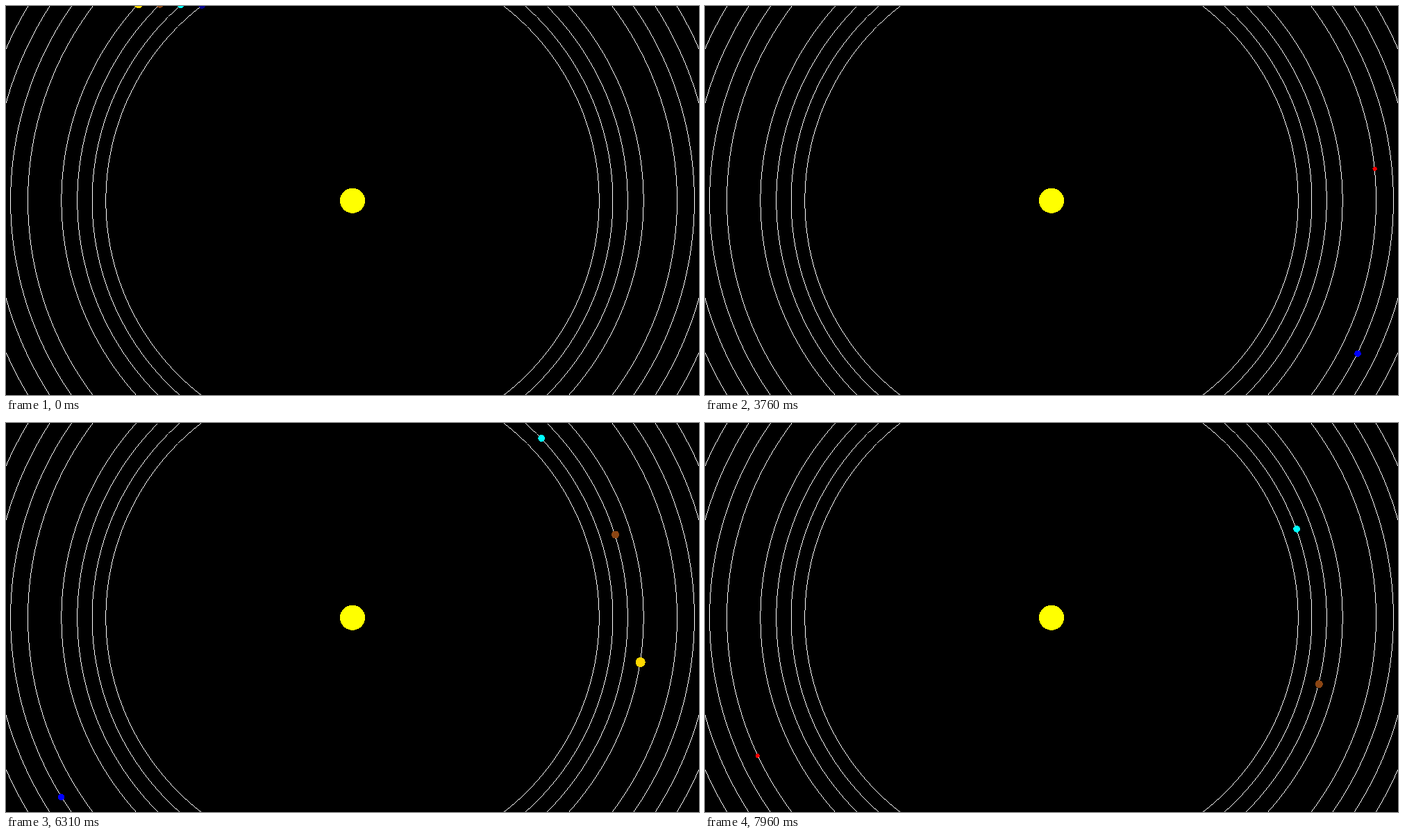
Write an HTML page with a canvas that moves like this. It is 998x561 px and loops after 7.99 s.

```html
<!DOCTYPE html>
<html lang="en">
<head>
<meta charset="utf-8">
<title>Orbits</title>
<style>
  html, body { margin: 0; width: 100%; height: 100%; overflow: hidden; background: #000; }
  canvas { display: block; }
</style>
</head>
<body>
<canvas id="stage" width="998" height="561"></canvas>
<script>
const W = 998, H = 561, LOOP = 7990, STEP_MS = 30;
const SCALE = W / 1920;
const CX = W / 2, CY = 540 * SCALE;

// Each planet starts on the top edge, `offset` units left of the sun.
const planets = [
  { offset: 900, speed: 0.05,   radius: 2.8, color: 'rgb(128,128,128)' },
  { offset: 840, speed: 0.0375, radius: 4.6, color: 'rgb(255,165,0)' },
  { offset: 780, speed: 0.025,  radius: 4.7, color: 'rgb(0,0,255)' },
  { offset: 720, speed: 0.02,   radius: 3.1, color: 'rgb(255,0,0)' },
  { offset: 600, speed: 0.0125, radius: 7,   color: 'rgb(255,215,0)' },
  { offset: 540, speed: 0.01,   radius: 5.5, color: 'rgb(139,69,19)' },
  { offset: 480, speed: 0.0075, radius: 4.9, color: 'rgb(0,255,255)' },
  { offset: 420, speed: 0.005,  radius: 4.95, color: 'rgb(0,0,139)' }
].map(p => ({
  ...p,
  orbit: Math.hypot(p.offset, 540),
  start: Math.atan2(-540, -p.offset)
}));

// The step counter idles briefly while every planet is out of view.
const phases = [
  { from: 2440, first: 76, last: Infinity },
  { from: 1740, first: 54, last: 75 },
  { from: 1350, first: 42, last: 53 },
  { from: 0,    first: 1,  last: 41 }
];

function stepAt(t) {
  const { from, first, last } = phases.find(p => t >= p.from);
  return Math.min(last, first + Math.floor((t - from) / STEP_MS));
}

// Hard-edged disc, filled row by row.
function disc(g, x, y, r, color) {
  g.fillStyle = color;
  for (let row = Math.floor(y - r); row <= y + r; row++) {
    const dy = row + 0.5 - y;
    if (Math.abs(dy) >= r) continue;
    const half = Math.sqrt(r * r - dy * dy);
    const left = Math.round(x - half);
    g.fillRect(left, row, Math.round(x + half) - left, 1);
  }
}

// Hard-edged one-pixel circle: one dot per row where steep, per column where flat.
function ring(g, r) {
  const limit = r * Math.SQRT1_2;
  for (let row = 0; row < H; row++) {
    const dy = row + 0.5 - CY;
    if (Math.abs(dy) > limit) continue;
    const dx = Math.sqrt(r * r - dy * dy);
    g.fillRect(Math.floor(CX - dx), row, 1, 1);
    g.fillRect(Math.floor(CX + dx), row, 1, 1);
  }
  for (let col = 0; col < W; col++) {
    const dx = col + 0.5 - CX;
    if (Math.abs(dx) > limit) continue;
    const dy = Math.sqrt(r * r - dx * dx);
    g.fillRect(col, Math.floor(CY - dy), 1, 1);
    g.fillRect(col, Math.floor(CY + dy), 1, 1);
  }
}

function makeBackdrop() {
  const canvas = document.createElement('canvas');
  canvas.width = W;
  canvas.height = H;
  const g = canvas.getContext('2d');
  g.fillStyle = '#000';
  g.fillRect(0, 0, W, H);
  g.fillStyle = '#fff';
  for (const p of planets) ring(g, (Math.floor(p.orbit) - 0.7) * SCALE);
  disc(g, CX, CY, 18, 'rgb(255,255,0)');
  return canvas;
}

const ctx = document.getElementById('stage').getContext('2d');
const backdrop = makeBackdrop();
const began = performance.now();

function draw() {
  const step = stepAt((performance.now() - began) % LOOP);
  ctx.drawImage(backdrop, 0, 0);
  for (const p of planets) {
    const angle = p.start + p.speed * step;
    const r = p.orbit * SCALE;
    disc(ctx, CX + r * Math.cos(angle), CY + r * Math.sin(angle), p.radius, p.color);
  }
  requestAnimationFrame(draw);
}
draw();
</script>
</body>
</html>
```
